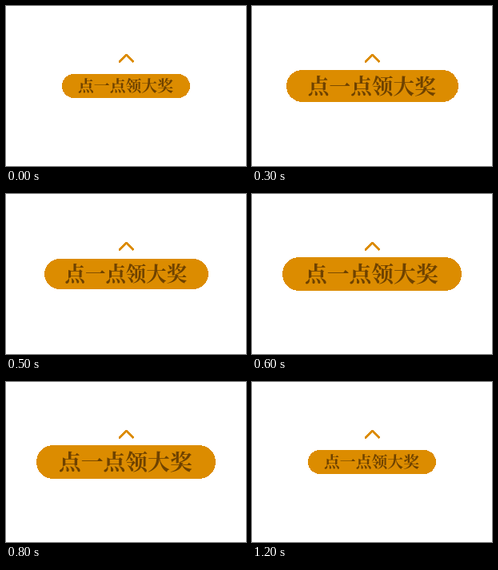
An HTML page that plays this animation: 300 px wide and 200 px high, repeating every 1.3 s.

```html
<!DOCTYPE html>
<html lang="zh-CN">
<head>
<meta charset="utf-8">
<title>点一点领大奖</title>
<style>
  html, body { margin: 0; width: 100%; height: 100%; overflow: hidden; background: #fff; }
  svg { display: block; width: 300px; height: 200px; }
  path, rect { shape-rendering: crispEdges; }
  text {
    font: 700 19.85px "Noto Serif CJK SC", "Noto Serif SC", "Source Han Serif SC", "Noto Serif", "Noto Sans CJK SC", serif;
    text-anchor: middle;
    fill: #6e4200;
  }
</style>
</head>
<body>
<svg viewBox="0 0 300 200">
  <path d="M142.3 69.5 L150.5 61.2 L158.7 69.5" fill="none" stroke="#dc8c00" stroke-width="2.6" stroke-linecap="round" stroke-linejoin="round"/>
  <rect id="pill" fill="#dc8c00"/>
  <text id="label" x="-0.5" y="7.4">点一点领大奖</text>
</svg>
<script>
  const STEP = 100, STEPS = 13, WIDTH = 160, HEIGHT = 30;
  // Key poses: [step, button width]
  const keys = [[0, 160], [2, 187], [4, 242], [5, 205], [7, 242], [10, 187], [12, 160]];
  const pill = document.getElementById("pill");
  const label = document.getElementById("label");

  function widthAt(step) {
    const i = Math.max(1, keys.findIndex(([at]) => at >= step));
    const [a, from] = keys[i - 1], [b, to] = keys[i];
    return Math.round(from + (to - from) * (step - a) / (b - a));
  }

  function draw(now) {
    const width = widthAt(Math.floor(now / STEP) % STEPS);
    const scale = width / WIDTH;
    const height = Math.round(HEIGHT * scale);
    // The pill sits on whole pixels
    const x = Math.ceil(150 - width / 2), y = Math.ceil(100 - height / 2);
    const box = { x, y, width, height, rx: height / 2 };
    for (const name in box) pill.setAttribute(name, box[name]);
    label.setAttribute("transform", `translate(${x + width / 2} ${y + height / 2}) scale(${scale})`);
  }

  const start = performance.now();
  function loop() {
    draw(performance.now() - start);
    requestAnimationFrame(loop);
  }
  loop();
</script>
</body>
</html>
```
